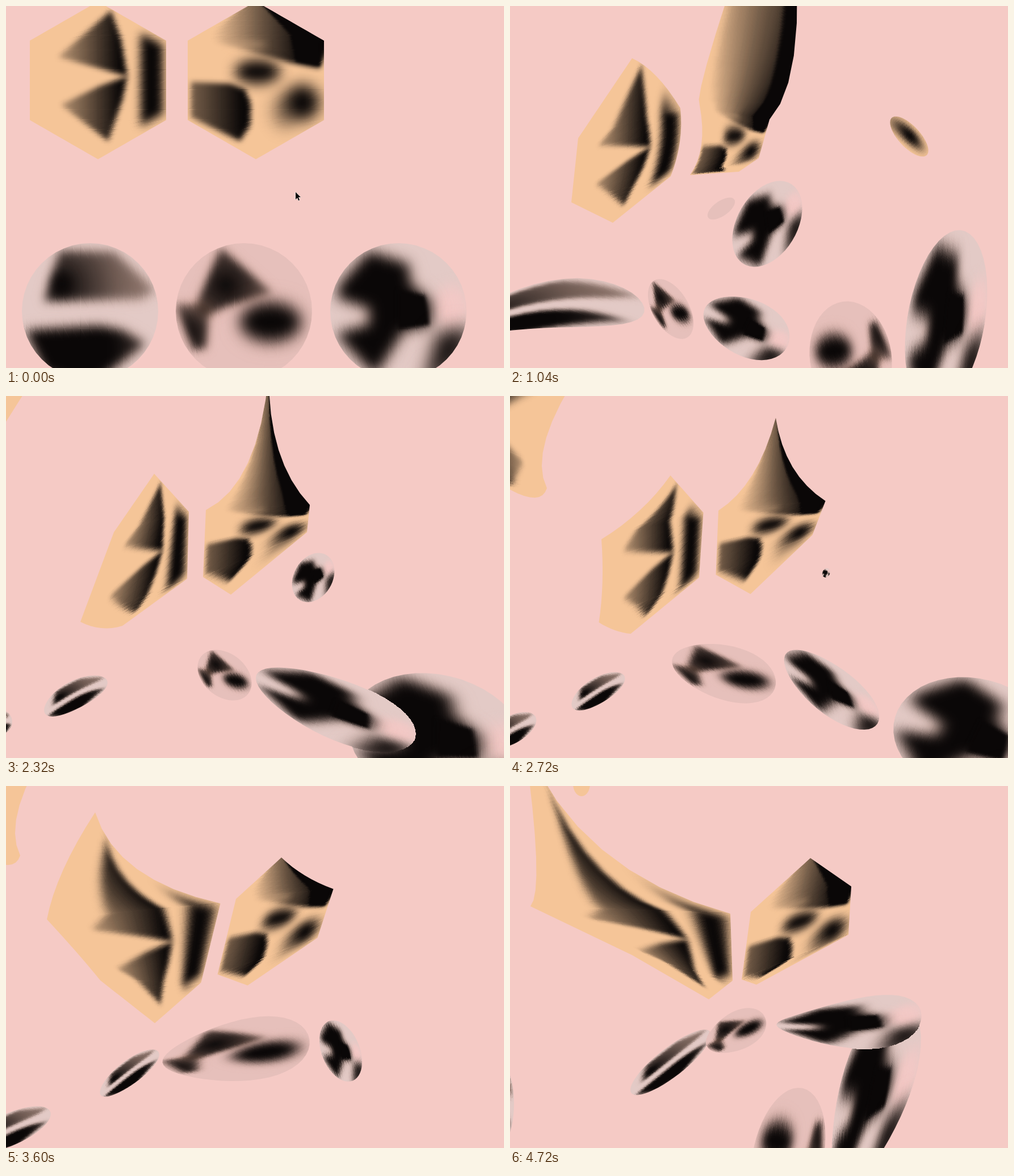
An HTML page with a canvas that plays this animation: 877 by 638 pixels, repeating every 4.8 s.

```html
<!DOCTYPE html>
<html lang="en">
<head>
<meta charset="utf-8">
<title>Liquid shapes</title>
<style>
html, body { margin: 0; width: 100%; height: 100%; overflow: hidden; background: #f5cac5; }
canvas { display: block; }
</style>
</head>
<body>
<canvas id="stage" width="877" height="638"></canvas>
<script>
const W = 877, H = 638, LOOP = 4800, STEP = 80;
const PAD = 20, TEX_W = 880, TEX_H = 700;
const ctx = document.getElementById('stage').getContext('2d');

function makeCanvas(w, h) {
  const c = document.createElement('canvas');
  c.width = w;
  c.height = h;
  return c.getContext('2d', { willReadFrequently: true });
}

// ---- Undistorted artwork ----
const tex = makeCanvas(TEX_W, TEX_H);
tex.translate(0, PAD);
const ink = a => `rgba(10,7,7,${a})`;

function cell(x, y, w, h, color, paint) {
  tex.save();
  tex.beginPath();
  tex.rect(x, y, w, h);
  tex.clip();
  tex.fillStyle = color;
  tex.fillRect(x, y, w, h);
  paint();
  tex.restore();
}

function trace(c, points) {
  points.forEach(([x, y], i) => i ? c.lineTo(x, y) : c.moveTo(x, y));
  c.closePath();
}

function pairs(flat) {
  const out = [];
  for (let i = 0; i < flat.length; i += 2) out.push([flat[i], flat[i + 1]]);
  return out;
}

function soften(blur, fill, halo) {
  if (halo) {
    tex.filter = `blur(${blur * 1.5}px)`;
    tex.fillStyle = 'rgba(165,115,88,.45)';
    tex.fill();
  }
  tex.filter = `blur(${blur}px)`;
  tex.fillStyle = fill;
  tex.fill();
  tex.filter = 'none';
}

function soft(blur, fill, flat, halo) {
  tex.beginPath();
  trace(tex, pairs(flat));
  soften(blur, fill, halo);
}

function oval(blur, fill, x, y, rx, ry, halo) {
  tex.beginPath();
  tex.ellipse(x, y, rx, ry, 0, 0, Math.PI * 2);
  soften(blur, fill, halo);
}

function stops(g, list) {
  list.forEach((a, i) => g.addColorStop(i / (list.length - 1), ink(a)));
  return g;
}
const across = (x0, x1, ...a) => stops(tex.createLinearGradient(x0, 0, x1, 0), a);
const around = (x, y, r, ...a) => stops(tex.createRadialGradient(x, y, 0, x, y, r), a);

cell(20, -20, 280, 310, '#f5c598', () => {
  const wedge = across(95, 200, .25, .62, 1);
  soft(5, wedge, [92, 90, 185, 8, 203, 60, 214, 124, 165, 110]);
  soft(5, wedge, [97, 174, 165, 141, 214, 124, 205, 165, 180, 238]);
  soft(8, ink(1), [237, 48, 276, 68, 276, 190, 237, 212]);
});
cell(300, -20, 280, 310, '#f5c598', () => {
  soft(5, across(365, 520, 0, .55, 1), [355, 60, 440, -25, 580, 50, 552, 110, 500, 100, 395, 70]);
  soft(2, ink(1), [425, -30, 590, 20, 553, 66, 553, 106, 510, 98, 500, 50]);
  oval(7, 'rgba(245,197,152,.35)', 425, 69, 34, 7);
  oval(11, ink(1), 443, 116, 40, 21);
  soft(5, across(320, 415, .5, .75, 1), [326, 134, 395, 137, 421, 147, 431, 172, 430, 210, 412, 238, 326, 196]);
  oval(13, ink(1), 522, 170, 30, 31);
  oval(14, ink(.45), 492, 185, 22, 30);
});
cell(10, 400, 275, 280, '#e3cac6', () => {
  soft(8, around(97, 492, 150, 1, .72, .45, .3), [95, 432, 190, 434, 262, 500, 240, 515, 68, 520], true);
  soft(9, around(120, 605, 140, 1, 1, .65), [35, 572, 165, 564, 205, 572, 245, 595, 148, 670, 70, 645], true);
  oval(10, ink(.9), 98, 490, 15, 20);
});
cell(285, 400, 270, 280, '#e6c0bb', () => {
  soft(7, around(387, 492, 85, 1, .75, .4), [378, 426, 468, 505, 385, 530, 350, 548, 332, 535], true);
  soft(7, around(318, 578, 60, 1, .8, .3), [298, 525, 358, 528, 352, 603, 330, 606], true);
  oval(13, ink(1), 466, 557, 53, 34, true);
});
cell(555, 400, 275, 280, '#e3cac6', () => {
  oval(12, '#f2c8c5', 785, 530, 32, 38);
  soft(11, ink(1), [588, 492, 640, 433, 708, 455, 712, 490, 748, 520, 748, 563, 700, 572,
    650, 650, 582, 578, 640, 562, 640, 532, 584, 514], true);
  soft(3, ink(1), [690, 500, 738, 510, 746, 562, 690, 570]);
  soft(14, ink(.9), [760, 578, 815, 566, 805, 625, 735, 670], true);
});
const texels = new Uint32Array(tex.getImageData(0, 0, TEX_W, TEX_H).data.buffer);

// ---- Outlines of SIDES clockwise points ----
const SIDES = 48, RAD = Math.PI / 180;
const steps = (n, f) => Array.from({ length: n }, (_, i) => f(i));

// Bent, tapered and turned ellipse; spin slides the artwork around it
function blobOutline([x, y, a, b, angle, bend, taper, spin]) {
  const cos = Math.cos(angle * RAD), sin = Math.sin(angle * RAD);
  return steps(SIDES, k => {
    const phi = k * 2 * Math.PI / SIDES + spin * RAD, s = -Math.cos(phi);
    const u = a * s, v = bend * (1 - s * s) - b * Math.sin(phi) * (1 + taper * s);
    return [x + u * cos - v * sin, y + u * sin + v * cos];
  });
}

// Six corners, each followed by the point its edge bows through
function hexOutline(flat) {
  const p = pairs(flat);
  return steps(SIDES, k => {
    const e = 2 * Math.floor(k / 8), s = k % 8 / 8;
    const a = p[e], m = p[e + 1], b = p[(e + 2) % 12];
    return [0, 1].map(i => (1 - s) * (1 - s) * a[i] + s * s * b[i]
      + 2 * s * (1 - s) * (2 * m[i] - (a[i] + b[i]) / 2));
  });
}

// Rungs join mirrored outline points into a grid
const ROWS = SIDES / 2, COLS = 8;
function grid(o) {
  const g = [];
  for (let r = 0; r <= ROWS; r++) {
    const a = o[(SIDES - r) % SIDES], b = o[r];
    for (let c = 0; c <= COLS; c++) {
      const s = c / COLS;
      g.push([a[0] + (b[0] - a[0]) * s, a[1] + (b[1] - a[1]) * s]);
    }
  }
  return g;
}

// ---- Shapes and their poses over time ----
const shapes = [];

function blob(x, y, a, b, angle = 0, bend = 0, taper = 0, spin = 0) {
  return [x, y, a, b, angle, bend, taper, spin];
}

function hex(corners, bows = {}) {
  const p = pairs(corners);
  return p.flatMap((a, i) => {
    const b = p[(i + 1) % 6];
    return [...a, ...(bows[i] || [(a[0] + b[0]) / 2, (a[1] + b[1]) / 2])];
  });
}

function shape(base) {
  const trim = base.length === 8 ? blobOutline : hexOutline;
  const keys = [];
  shapes.push({ trim, keys, source: grid(trim(base)) });
  const self = { at: (time, pose) => (keys.push({ time, pose }), self) };
  return self;
}

const hexagon = x => hex([x, -8, x + 120, 61, x + 120, 201, x, 270, x - 120, 201, x - 120, 61]);
const disc = x => blob(x, 538, 120, 120);
const hexLeft = hexagon(162), hexRight = hexagon(440);
const discLeft = disc(148), discMid = disc(419), discRight = disc(691);

// Mass entering at the upper left, and a late chip
const corner = hex([-30, 90, -110, 60, -120, -100, 0, -150, 60, -50, -25, 85]);
const hidden = corner.map(v => v - 80);
shape(hexLeft)
  .at(1840, hidden)
  .at(2320, corner)
  .at(3120, hex([30, 240, -80, 150, -90, -100, 60, -190, 200, -60, 155, 240], { 4: [110, 130], 5: [115, 271] }))
  .at(4080, hidden);
shape(blob(65, 130, 6, 6))
  .at(4480, blob(126, -25, 14, 20))
  .at(4720, blob(126, -4, 15, 22));

shape(hexLeft)
  .at(0, hexLeft)
  .at(1040, hex([215, 92, 300, 180, 283, 300, 181, 382, 108, 346, 120, 233], { 0: [258, 124], 1: [299, 240] }))
  .at(1760, hex([234, 126, 307, 198, 298, 323, 214, 383, 131, 364, 166, 240]))
  .at(2320, hex([261, 137, 322, 204, 319, 322, 205, 405, 131, 398, 190, 240], { 3: [168, 409] }))
  .at(3120, hex([304, 143, 359, 207, 347, 318, 220, 433, 182, 400, 132, 265], { 4: [165, 338], 5: [232, 214] }))
  .at(4080, hex([10, -50, 396, 207, 340, 375, 304, 403, 150, 285, 12, 205], { 0: [130, 118], 5: [-30, 80] }))
  .at(4720, hex([25, -80, 388, 225, 392, 343, 350, 376, 215, 298, 36, 212], { 0: [162, 112], 5: [46, 125] }));
shape(hexRight)
  .at(0, hexRight)
  .at(1040, hex([480, -300, 457, 200, 438, 268, 403, 292, 317, 298, 334, 175],
    { 0: [505, 30], 4: [337, 245], 5: [362, 50] }))
  .at(1760, hex([470, -200, 500, 187, 495, 243, 385, 320, 323, 318, 345, 192], { 0: [484, 95], 5: [402, 90] }))
  .at(2320, hex([463, -40, 535, 192, 530, 240, 396, 350, 347, 319, 352, 201], { 0: [480, 95], 5: [426, 118] }))
  .at(3120, hex([473, 117, 576, 178, 535, 250, 451, 348, 378, 311, 382, 203], { 0: [515, 155] }))
  .at(4080, hex([497, 135, 577, 185, 562, 285, 400, 355, 367, 353, 428, 195]))
  .at(4720, hex([529, 127, 601, 177, 596, 262, 434, 350, 408, 341, 424, 222]));
shape(blob(522, 175, 48, 52))
  .at(480, blob(690, 235, 1, 1, 50))
  .at(1040, blob(703, 230, 45, 19, 47))
  .at(1600, blob(712, 225, 1, 1, 50));

// Lower row
shape(discLeft)
  .at(0, discLeft)
  .at(1040, blob(33, 575, 208, 36, -12, -42, .8))
  .at(1760, blob(149, 542, 155, 40, -11, -32, .25))
  .at(2320, blob(123, 530, 62, 24, -28, -4))
  .at(3120, blob(188, 512, 45, 20, -35))
  .at(4080, blob(247, 501, 82, 21, -39, -3, .1))
  .at(4720, blob(283, 487, 88, 25, -38));
shape(discMid)
  .at(0, discMid)
  .at(1040, blob(283, 534, 58, 32, 60, 0, 0, -75))
  .at(1760, blob(346, 511, 52, 30, 52, 0, 0, -65))
  .at(2320, blob(385, 492, 53, 38, 39, 0, 0, -39))
  .at(3120, blob(368, 484, 135, 57, -8, -3, .25))
  .at(4080, blob(442, 450, 127, 48, -10, 5, .35))
  .at(4720, blob(398, 433, 57, 33, -28, 0, .15));
shape(discRight)
  .at(0, discRight)
  .at(1040, blob(768, 553, 160, 68, 100, 0, 0, -100))
  .at(1760, blob(800, 600, 168, 68, 105, 0, .4, -100))
  .at(2320, blob(760, 605, 113, 160, 105, 0, 0, -100))
  .at(3120, blob(872, 598, 95, 125, 100, 0, 0, -60))
  .at(3920, blob(960, 760, 40, 40, 100, 0, 0, -60));
shape(discRight)
  .at(4240, blob(610, 740, 30, 20, 107, 0, 0, -107))
  .at(4720, blob(638, 548, 175, 60, 108, 0, -.25, -107));
shape(discRight)
  .at(320, blob(520, 570, 1, 1))
  .at(1040, blob(416, 566, 80, 50, 24, 0, .1))
  .at(1760, blob(541, 562, 152, 70, 15, 0, .25))
  .at(2320, blob(580, 548, 150, 52, 22, 3, .15))
  .at(3120, blob(552, 485, 53, 30, 54, 0, 0, -50))
  .at(4080, blob(627, 449, 60, 37, 82, 0, 0, -85))
  .at(4720, blob(597, 412, 128, 42, -4, 8, .5));

// Passing drops
shape(discRight)
  .at(400, blob(430, 410, 2, 2, -60, 0, 0, 40))
  .at(1040, blob(453, 384, 82, 53, -60, 0, 0, 40))
  .at(1760, blob(505, 362, 72, 62, -65, 0, -.15, 40))
  .at(2320, blob(541, 320, 46, 34, -60, 0, 0, 40))
  .at(2800, blob(560, 310, 1, 1, -60, 0, 0, 40));
shape(blob(505, 650, 6, 6))
  .at(480, blob(360, 370, 1, 1, -35))
  .at(1040, blob(372, 357, 28, 13, -35))
  .at(1600, blob(385, 345, 1, 1, -35));
shape(discMid)
  .at(400, blob(600, 720, 5, 5, 0, 0, 0, 180))
  .at(1040, blob(600, 620, 72, 100, -8, 0, 0, 180))
  .at(1600, blob(620, 730, 5, 5, 0, 0, 0, 180));
shape(discMid)
  .at(3600, blob(470, 700, 5, 5, 0, 0, 0, 180))
  .at(4080, blob(473, 651, 23, 88, 0, 0, 0, 180))
  .at(4720, blob(490, 650, 62, 120, 12, 0, 0, 180));
shape(discLeft)
  .at(2160, blob(-20, 590, 1, 1, -20))
  .at(2320, blob(-12, 575, 23, 22, -20))
  .at(3120, blob(15, 603, 76, 26, -38))
  .at(4080, blob(0, 607, 78, 30, -10))
  .at(4720, blob(-20, 560, 27, 75));

// ---- Rendering ----
const layer = makeCanvas(W, H);
const image = layer.createImageData(W, H);
const pixels = new Uint32Array(image.data.buffer);
const clamp = (v, lo, hi) => v < lo ? lo : v > hi ? hi : v;

// Textured triangle, one pixel oversized so the clip path gives the edge
function triangle(a, b, c, ta, tb, tc) {
  let area = (b[0] - a[0]) * (c[1] - a[1]) - (b[1] - a[1]) * (c[0] - a[0]);
  if (Math.abs(area) < 1e-3) return;
  if (area < 0) {
    [b, c, tb, tc] = [c, b, tc, tb];
    area = -area;
  }
  const x0 = Math.max(0, Math.floor(Math.min(a[0], b[0], c[0]) - 1));
  const x1 = Math.min(W - 1, Math.ceil(Math.max(a[0], b[0], c[0]) + 1));
  const y0 = Math.max(0, Math.floor(Math.min(a[1], b[1], c[1]) - 1));
  const y1 = Math.min(H - 1, Math.ceil(Math.max(a[1], b[1], c[1]) + 1));
  const la = -Math.hypot(c[0] - b[0], c[1] - b[1]);
  const lb = -Math.hypot(a[0] - c[0], a[1] - c[1]);
  const lc = -Math.hypot(b[0] - a[0], b[1] - a[1]);
  for (let y = y0; y <= y1; y++) for (let x = x0; x <= x1; x++) {
    const px = x + .5, py = y + .5;
    const wa = (c[0] - b[0]) * (py - b[1]) - (c[1] - b[1]) * (px - b[0]);
    const wb = (a[0] - c[0]) * (py - c[1]) - (a[1] - c[1]) * (px - c[0]);
    if (wa < la || wb < lb || area - wa - wb < lc) continue;
    const u = clamp(wa / area, 0, 1), v = clamp(wb / area, 0, 1 - u), w = 1 - u - v;
    const tx = clamp(u * ta[0] + v * tb[0] + w * tc[0], 0, TEX_W - 1) | 0;
    const ty = clamp(u * ta[1] + v * tb[1] + w * tc[1] + PAD, 0, TEX_H - 1) | 0;
    pixels[y * W + x] = texels[ty * TEX_W + tx];
  }
}

function poseAt(keys, t) {
  const i = keys.findIndex(k => k.time >= t);
  if (i < 0 || t < keys[0].time) return null;
  if (i === 0) return keys[0].pose;
  const a = keys[i - 1], b = keys[i], s = (t - a.time) / (b.time - a.time);
  return a.pose.map((v, n) => v + (b.pose[n] - v) * s);
}

function drawMesh(source, target) {
  for (let r = 0; r < ROWS; r++) for (let c = 0; c < COLS; c++) {
    const i = r * (COLS + 1) + c, j = i + COLS + 1;
    triangle(target[i], target[i + 1], target[j], source[i], source[i + 1], source[j]);
    triangle(target[i + 1], target[j + 1], target[j], source[i + 1], source[j + 1], source[j]);
  }
}

function drawPointer(x, y) {
  ctx.beginPath();
  trace(ctx, pairs([0, 0, 0, 13, 3, 10, 5, 15, 7, 14, 5, 9, 9, 9]).map(p => [p[0] + x, p[1] + y]));
  ctx.fillStyle = '#0a0808';
  ctx.strokeStyle = '#fff';
  ctx.lineWidth = 1;
  ctx.stroke();
  ctx.fill();
}

function draw(t) {
  pixels.fill(0);
  ctx.fillStyle = '#f5cac5';
  ctx.fillRect(0, 0, W, H);
  ctx.save();
  ctx.beginPath();
  for (const { source, trim, keys } of shapes) {
    const pose = poseAt(keys, t);
    if (!pose) continue;
    const edge = trim(pose);
    drawMesh(source, grid(edge));
    trace(ctx, edge);
  }
  layer.putImageData(image, 0, 0);
  ctx.clip();
  ctx.drawImage(layer.canvas, 0, 0);
  ctx.restore();
  if (t < STEP) drawPointer(510, 328);
}

let shown = -1;
function tick() {
  const t = Math.floor(performance.now() % LOOP / STEP) * STEP;
  if (t !== shown) draw(shown = t);
  requestAnimationFrame(tick);
}
tick();
</script>
</body>
</html>
```
